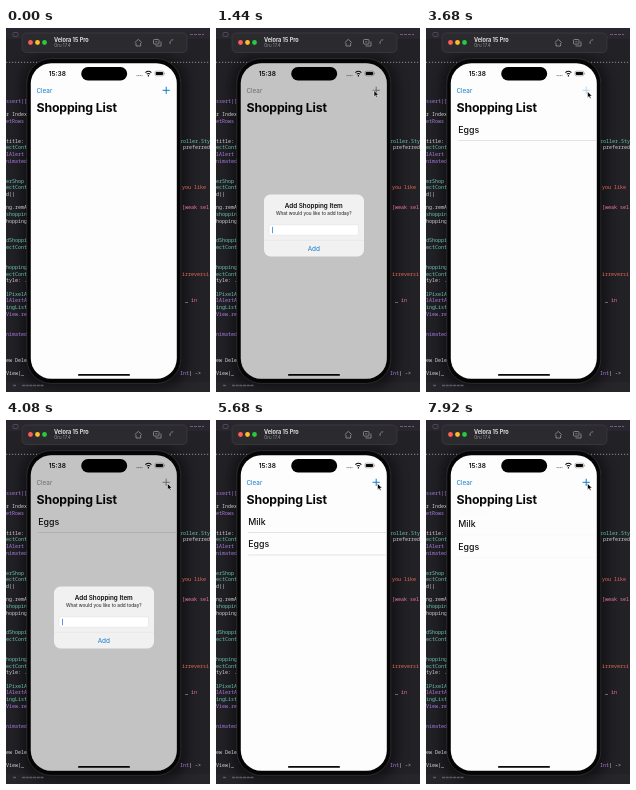
These frames come from a looping animation (204 px wide and 364 px high, 8000 ms). An HTML page:

```html
<!DOCTYPE html>
<html lang="en">
<head>
<meta charset="utf-8">
<title>Shopping list</title>
<style>
html, body { margin: 0; width: 100%; height: 100%; overflow: hidden; background: #212126; }
svg { display: block; width: 100vw; height: 100vh; }
text { font-family: Inter, Roboto, sans-serif; white-space: pre; }
.code text { font: 500 5px "Noto Sans Mono", "DejaVu Sans Mono", monospace; }
</style>
</head>
<body>
<svg viewBox="0 0 204 364" xmlns="http://www.w3.org/2000/svg">
  <defs>
    <clipPath id="screen"><rect x="24.8" y="35.2" width="146" height="315.6" rx="20.4"/></clipPath>
    <filter id="blur" x="-30%" y="-30%" width="160%" height="160%"><feGaussianBlur stdDeviation="7"/></filter>
  </defs>
  <rect width="204" height="364" fill="#212126"/>
  <rect width="204" height="11" fill="#29262f"/>
  <rect y="354" width="204" height="10" fill="#25252a"/>
  <rect x="17" y="30" width="162" height="330" rx="24" fill="#000" opacity=".55" filter="url(#blur)"/>
  <rect x="7" y="4.5" width="5" height="4" rx="1" fill="none" stroke="#68636f" stroke-width=".6"/>
  <path d="M184 6.5h14" stroke="#68636f" stroke-dasharray="3 1"/>
  <path d="M0 34.3H204" stroke="#b9b9c4" stroke-width=".7" stroke-dasharray="1.2 1.8"/>
  <g id="code" class="code"></g>
  <path d="M7 357.5h3M16 357.5h22" stroke="#5c5a64" stroke-width="1.4" stroke-dasharray="3 .7"/>

  <rect x="16" y="5" width="165" height="19.5" rx="4.5" fill="#2b2a2e" stroke="#48474c" stroke-width=".5"/>
  <circle cx="24.5" cy="14.5" r="2.4" fill="#fb5f57"/>
  <circle cx="31.5" cy="14.5" r="2.4" fill="#fdbc2e"/>
  <circle cx="38.5" cy="14.5" r="2.4" fill="#29c940"/>
  <text x="48" y="14" font-size="5.5" font-weight="700" fill="#e2e2e4">Velora 15 Pro</text>
  <text x="48" y="19.3" font-size="4.4" fill="#929296">Oru 17.4</text>
  <g fill="none" stroke="#a4a4a8" stroke-width=".7">
    <path d="M128.8 14.6l3.5-3.2 3.5 3.2M130 15v3h4.6v-3"/>
    <rect x="147.5" y="11.5" width="5.5" height="4.6" rx="1"/>
    <path d="M149.5 18h5.5v-4.5M149.3 13.8h2"/>
    <path d="M164.2 16a3 3 0 0 1 3-4.2"/>
  </g>

  <rect x="20.8" y="30.6" width="154" height="324.8" rx="24.5" fill="#050506" stroke="#38373b" stroke-width=".7"/>
  <g clip-path="url(#screen)">
    <rect x="24" y="35" width="148" height="317" fill="#fdfdfd"/>
    <g id="rows"></g>
    <text x="30.5" y="84" font-size="12.3" font-weight="700" letter-spacing="-.14" fill="#080808">Shopping List</text>
    <text id="clear" x="30.5" y="64.9" font-size="6.3">Clear</text>
    <path id="plus" d="M156.6 62.3h7.2M160.2 58.7v7.2" stroke-width="1"/>
    <text x="42.7" y="47.9" font-size="6.6" font-weight="600" fill="#080808">15:38</text>
    <path d="M130.5 47.6h6" stroke="#8a8a8a" stroke-width="1" stroke-dasharray="1.2 .5"/>
    <g fill="none" stroke="#080808">
      <path d="M139.4 44.6q3-2.6 6 0M140.7 46.2q1.7-1.4 3.4 0" stroke-width="1.1"/>
      <path d="M142.4 47.6v.3" stroke-width="1.3" stroke-linecap="round"/>
      <rect x="149" y="43.2" width="8.8" height="4.6" rx="1.4" stroke="#777" stroke-width=".5"/>
    </g>
    <rect x="149.7" y="43.9" width="7.4" height="3.2" rx=".8" fill="#080808"/>
    <path d="M158.6 44.8v1.4" stroke="#777" stroke-width=".6"/>
    <rect x="72" y="346" width="52" height="1.8" rx=".9" fill="#080808"/>
    <rect id="dim" x="24" y="35" width="148" height="317"/>
    <rect x="75.2" y="39" width="46" height="13.5" rx="6.75" fill="#000"/>
  </g>

  <g id="alert">
    <rect x="48" y="166.5" width="100" height="62" rx="6.5" fill="#f1f1f2"/>
    <g text-anchor="middle">
      <text x="97.8" y="179.7" font-size="6.3" font-weight="600" fill="#0a0a0a">Add Shopping Item</text>
      <text x="97.8" y="187.2" font-size="4.7" fill="#1a1a1a">What would you like to add today?</text>
      <text x="97.8" y="222.7" font-size="6.4" fill="#157ad0">Add</text>
    </g>
    <rect x="53" y="196.8" width="89.5" height="10.4" rx="1.6" fill="#fff" stroke="#d3d3d5" stroke-width=".4"/>
    <path d="M48 212.3h100" stroke="#d9d9dc" stroke-width=".4"/>
    <text id="entry" x="56" y="204" font-size="5.1" fill="#111"></text>
    <rect id="caret" y="198.8" width=".8" height="6.4" fill="#2f7fe0"/>
  </g>
  <path id="cursor" d="M0 0v6.2l1.5-1.3 1 2.2 1.1-.5-1-2.1h2z" fill="#0a0a0a" stroke="#fff" stroke-width=".5"/>
</svg>
<script>
const LOOP = 8000, ROW = 22.5, LINE = 6.65, FADE = 240, INSERT = 300;
const $ = id => document.getElementById(id);
const clamp = v => Math.max(0, Math.min(1, v));
const ease = v => { v = clamp(v); return v * v * (3 - 2 * v); };
const span = (t, start, len) => ease((t - start) / len);
const mix = (a, b, k) => a + (b - a) * k;

function add(parent, tag, attrs, text) {
  const el = document.createElementNS('http://www.w3.org/2000/svg', tag);
  for (const key in attrs) el.setAttribute(key, attrs[key]);
  if (text) el.textContent = text;
  parent.appendChild(el);
  return el;
}

// Each entry: press "+", alert opens, keys are typed, alert closes, row is inserted.
const entries = [
  { word: 'Eggs', press: 1040, open: 1130, type: 1880, gap: 150, close: 2680, insert: 2980 },
  { word: 'Milk', press: 3640, open: 3840, type: 4260, gap: 150, close: 4960, insert: 5240 },
  { word: 'Apples', press: 6040, open: 6160, type: 6560, gap: 140, close: 7500, insert: 7860 }
];

// Code behind the phone: line number, x, colour, text.
const pink = '#f078aa', violet = '#a97ce0', teal = '#6cc4b4', pale = '#d0d0d4', red = '#ec6a5a';
const code = [
  [0, 0, violet, 'ssert(['], [2, 0, pale, 'r Index'], [3, 0, violet, 'etRows'],
  [6, 0, pale, 'title: '], [7, 0, teal, 'ectCont'], [8, 0, violet, 'lAlert'], [9, 0, violet, 'nimated:'],
  [12, 0, teal, 'erShop'], [13, 0, teal, 'ectCont'], [14, 0, pale, 'd()'],
  [16, 0, pale, 'ng.remA'], [17, 0, teal, 'shopping'], [18, 0, pale, 'hopping'],
  [21, 0, teal, 'dShoppi'], [22, 0, teal, 'ectCont'],
  [25, 0, teal, 'hopping.'], [26, 0, teal, 'ectCont'], [27, 0, pale, 'tyle: .'],
  [29, 0, teal, 'lPixelA'], [30, 0, violet, 'lAlertA'], [31, 0, teal, 'ingList'], [32, 0, violet, 'View.re'],
  [35, 0, violet, 'nimated:'], [39, 0, pale, 'ew Dele'], [41, 0, pale, 'View(_ '],
  [6, 174, teal, 'roller.Sty'], [7, 177, pale, 'preferred'], [13, 176, red, 'you like '],
  [16, 176, pink, '[weak sel'], [26, 176, red, 'irreversi'], [30, 179, pale, '_ '], [30, 185, pink, 'in'],
  [41, 174, violet, 'Int'], [41, 183, pale, ') ->']
];
for (const [line, x, fill, text] of code) add($('code'), 'text', { x, y: 74.8 + line * LINE, fill }, text);

for (const e of entries) {
  e.row = add($('rows'), 'g', {});
  add(e.row, 'text', { x: 32.2, y: 104.6, 'font-size': 8.8, 'font-weight': 500, fill: '#111' }, e.word);
  e.rule = add(e.row, 'path', { d: 'M32.2 112.5H171', stroke: '#d2d2d5', 'stroke-width': .6 });
}

function drawCursor(t) {
  const enter = span(t, 300, 650), shift = span(t, 3200, 350);
  const x = mix(mix(210, 158, enter), 161.5, shift);
  const y = mix(mix(98, 62.5, enter), 63.5, shift);
  $('cursor').setAttribute('transform', `translate(${x} ${y})`);
}

function draw(t) {
  let shown = 0, tint = 0, pressed = 0, active = entries[0];
  for (const e of entries) {
    if (t >= e.press) active = e;
    shown += span(t, e.open, FADE) * (1 - clamp((t - e.close) / FADE));
    tint += span(t, e.open, FADE) * (1 - span(t, e.close, 90));
    pressed += clamp((t - e.press) / 30) * (1 - span(t, e.open, 120));
  }

  // Separators are hidden while the rows slide.
  const sliding = entries.some(e => t > e.insert && t < e.insert + INSERT);
  entries.forEach((e, i) => {
    const push = entries.slice(i + 1).reduce((sum, next) => sum + span(t, next.insert, INSERT), 0);
    const k = span(t, e.insert, INSERT);
    e.row.setAttribute('transform', `translate(0 ${ROW * (push + (k - 1) * .5)})`);
    e.row.setAttribute('opacity', k * k);
    e.rule.setAttribute('opacity', sliding ? .15 : 1);
  });

  const blue = `rgb(${mix(16, 140, tint)},${mix(126, 140, tint)},${mix(204, 144, tint)})`;
  $('clear').setAttribute('fill', blue);
  $('plus').setAttribute('stroke', blue);
  $('plus').setAttribute('opacity', 1 - .7 * pressed);
  $('dim').setAttribute('opacity', .23 * shown);
  $('alert').setAttribute('opacity', shown);

  const count = Math.max(0, Math.floor((t - active.type) / active.gap) + 1);
  const entry = $('entry');
  entry.textContent = active.word.slice(0, count);
  const width = entry.textContent ? entry.getComputedTextLength() : 0;
  $('caret').setAttribute('x', 56.2 + width);
  $('caret').setAttribute('opacity', t < active.close ? 1 : 0);
  drawCursor(t);
}

const start = performance.now();
function tick() {
  draw((performance.now() - start) % LOOP);
  requestAnimationFrame(tick);
}
tick();
</script>
</body>
</html>
```
